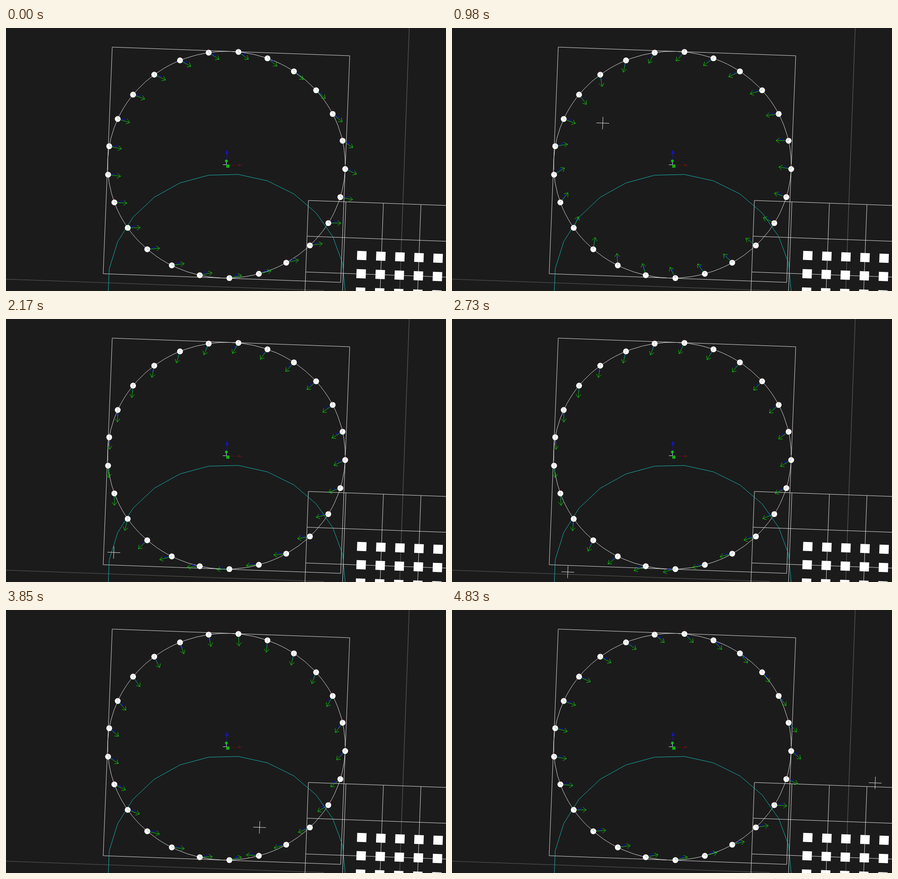
An HTML page with a canvas for the animation above (4.9 s loop, 969 by 578 pixels).

```html
<!DOCTYPE html>
<html>
<head>
<meta charset="utf-8">
<style>
html, body { margin: 0; width: 100%; height: 100%; overflow: hidden; background: #1b1b1b; }
canvas { display: block; }
</style>
</head>
<body>
<canvas id="stage" width="969" height="578"></canvas>
<script>
const ctx = document.getElementById('stage').getContext('2d');
const LOOP = 4900, STEP = 70, COUNT = 25, TILT = 0.0363;

// Target path: time, marker x, y, then the point the arrows aim at
const path = [
  [0, 1030, 368, 1000, 428],
  [140, 1035, 190, 1005, 250],
  [280, 1000, -20, 975, 35],
  [420, 770, -40, 752, 10],
  [560, 585, 8, 577, 52],
  [700, 478, 75, 478, 115],
  [980, 332, 209, 347, 240],
  [1260, 287, 325, 299, 358],
  [1680, 264, 451, 269, 488],
  [2200, 237, 516, 239, 561],
  [2730, 255, 556, 252, 612],
  [3360, 390, 521, 373, 582],
  [4340, 743, 430, 715, 490],
  [4830, 932, 380, 902, 441]
];

function slope(i, k) {
  const a = path[Math.max(i - 1, 0)], b = path[Math.min(i + 1, path.length - 1)];
  return (b[k] - a[k]) / (b[0] - a[0]);
}

// Cubic Hermite interpolation of column k
function sample(t, k) {
  let i = 0;
  while (i < path.length - 2 && t >= path[i + 1][0]) i++;
  const a = path[i], b = path[i + 1], d = b[0] - a[0];
  const s = (t - a[0]) / d, r = 1 - s;
  return r * r * (1 + 2 * s) * a[k] + s * s * (3 - 2 * s) * b[k]
    + d * s * r * (r * slope(i, k) - s * slope(i + 1, k));
}

const dots = Array.from({ length: COUNT }, (_, i) => {
  const a = i / COUNT * 2 * Math.PI, c = Math.cos(a), s = Math.sin(a);
  return [485.5 + 261.5 * c - 10 * s, 300.5 + 9.5 * c + 249 * s];
});

function line(color, ...pts) {
  ctx.strokeStyle = color;
  ctx.beginPath();
  for (let i = 0; i < pts.length; i += 2) ctx.lineTo(pts[i], pts[i + 1]);
  ctx.stroke();
}

function disc(color, x, y, r) {
  ctx.fillStyle = color;
  ctx.beginPath();
  ctx.arc(x, y, r, 0, 2 * Math.PI);
  ctx.fill();
}

function triangle(color, ...p) {
  ctx.fillStyle = color;
  ctx.beginPath();
  for (let i = 0; i < 6; i += 2) ctx.lineTo(p[i], p[i + 1]);
  ctx.fill();
}

function arrow(color, x, y, tx, ty, back, side) {
  const a = Math.atan2(ty - y, tx - x), c = Math.cos(a), s = Math.sin(a);
  line(color, x, y, tx, ty);
  line(color, tx - back * c + side * s, ty - back * s - side * c, tx, ty,
    tx - back * c - side * s, ty - back * s + side * c);
}

function drawScene() {
  line('#686868', 888, 0, 867, 578);
  line('#5c5c5c', 0, 552, 700, 577);

  const white = '#d8d8d8';
  for (let i = 0; i < 3; i++) {
    const x = 666 - 3 * i, y = 379 + 78.6 * i;
    line(white, x, y, 969, y + (969 - x) * TILT);
  }
  for (let i = 0; i < 4; i++) {
    const x = 666 + 82.6 * i, y = 379 + 3 * i;
    line(white, x, y, x - (578 - y) * 0.038, 578);
  }
  ctx.fillStyle = '#fff';
  for (let row = 0; row < 3; row++) for (let col = 0; col < 5; col++) {
    ctx.save();
    ctx.translate(783.5 + 42 * col - 1.4 * row, 500 + 1.5 * col + 40.2 * row);
    ctx.rotate(TILT);
    ctx.fillRect(-10.3, -10, 20.6, 20);
    ctx.restore();
  }

  line(white, 234, 42, 757, 61, 737, 559, 214, 540, 234, 42);

  ctx.save();
  ctx.transform(261.5, 9.5, -10, 249, 485.5, 300.5);
  ctx.beginPath();
  ctx.arc(0, 0, 1, 0, 2 * Math.PI);
  ctx.restore();
  ctx.strokeStyle = white;
  ctx.stroke();

  const arc = dots.slice(12).concat(dots.slice(0, 2));
  line('#18b4b0', ...arc.flatMap(([x, y]) => [x, y + 269.3]));
}

function drawGizmo(red) {
  line(red, 488, 301, 514, 301.5);
  triangle(red, 512, 298.5, 520, 301.5, 512, 304.5);
  line('#1414c8', 486.5, 300, 486.5, 276);
  triangle('#1414c8', 483, 277, 486.5, 267, 490, 277);
  line('#ddd', 477.5, 300.5, 492, 300.5);
  line('#ddd', 485.5, 294, 485.5, 307);
  disc('#10c010', 485.3, 292.3, 3);
  ctx.fillStyle = '#10b010';
  ctx.fillRect(485, 300, 7, 7);
}

function drawDot([x, y], tx, ty, red) {
  const d = Math.hypot(tx - x, ty - y) || 1, ux = (tx - x) / d, uy = (ty - y) / d;
  line(red, x, y, x, y - 11);
  arrow('#1010b8', x, y, x + 18 * ux, y + 17 * uy - 3.5, 4, 3);
  arrow('#10c810', x, y, x + 27.8 * ux, y + 26.6 * uy, 7.5, 5.5);
  disc('#fff', x, y, 6.4);
  line('#b8b8b8', x, y - 5, x, y, x + 5 * ux, y + 5 * uy);
}

function draw(t) {
  t = t < 2 * STEP ? 0 : Math.floor(t / STEP) * STEP;
  const [mx, my, tx, ty] = [1, 2, 3, 4].map(k => sample(t, k));
  const vivid = t >= 1260 && t < 1820;

  ctx.fillStyle = '#1b1b1b';
  ctx.fillRect(0, 0, 969, 578);
  ctx.lineWidth = 1;
  drawScene();
  drawGizmo(vivid ? '#a01414' : '#581414');
  for (const dot of dots) drawDot(dot, tx, ty, vivid ? '#a01818' : '#501818');
  line('#e0e0e0', mx - 14, my - 0.5, mx + 14, my + 0.5);
  line('#e0e0e0', mx + 0.5, my - 13.5, mx - 0.5, my + 13.5);
}

function tick() {
  draw(performance.now() % LOOP);
  requestAnimationFrame(tick);
}
tick();
</script>
</body>
</html>
```
